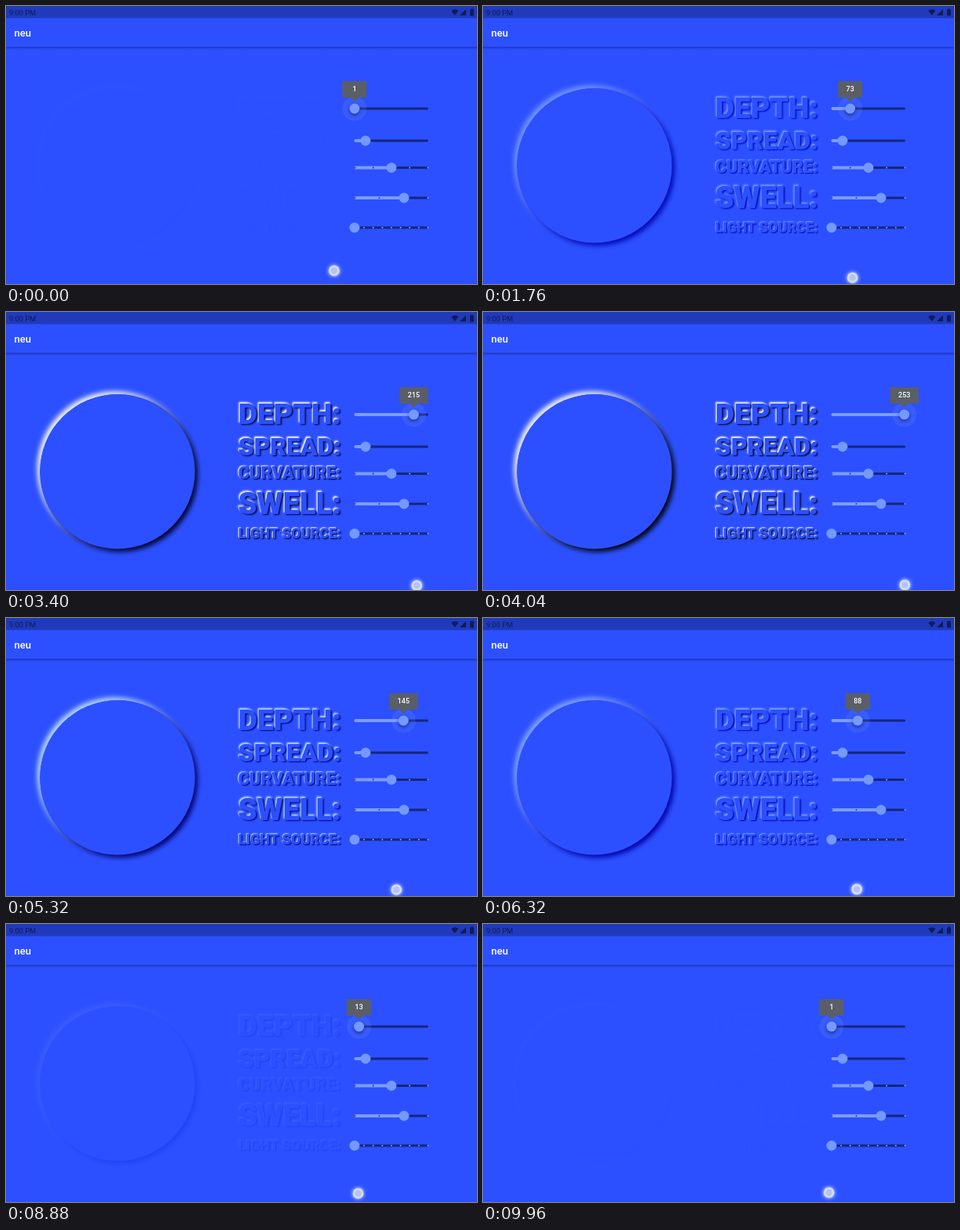
An HTML page with a canvas for the animation above (10 s loop, 600 by 355 pixels).

```html
<!DOCTYPE html>
<html lang="en">
<head>
<meta charset="utf-8">
<title>neu</title>
<style>
html, body { margin: 0; width: 600px; height: 355px; overflow: hidden; background: #2c50ff; }
canvas { display: block; }
</style>
</head>
<body>
<canvas id="stage" width="600" height="355"></canvas>
<script>
const c = document.getElementById('stage').getContext('2d');
const LOOP = 10000, STEP = 40;
const BASE = [44, 80, 255], BG = `rgb(${BASE})`;
const ACTIVE = '#7c9dff', THUMB = '#7499ff', TRACK = '#14277c', INK = '#101c58';
const LEFT = 444, RIGHT = 538;
const FONT = 'Roboto, sans-serif';

// time, x, y of the dragging finger
const drag = [
  [0, 418, 338], [1760, 470.7, 347], [2680, 494.5, 349.8], [2800, 500, 350],
  [3700, 535, 349], [4040, 537.4, 348.5], [4250, 538.5, 348.4], [4900, 535, 347.5],
  [5320, 497.4, 347], [5500, 485, 346.8], [7840, 460, 345.5], [9300, 444, 343.4],
  [9700, 440.7, 343], [10000, 440.7, 343]
];
const rows = [
  { label: 'DEPTH:', y: 131, mid: 129.5 },
  { label: 'SPREAD:', y: 172, mid: 171.5, at: 458 },
  { label: 'CURVATURE:', y: 206.5, mid: 205.5, at: 491, parts: 4 },
  { label: 'SWELL:', y: 245, mid: 244, at: 507, parts: 3 },
  { label: 'LIGHT SOURCE:', y: 283, mid: 282.5, at: 444, parts: 8 }
];

const clamp = (v, lo, hi) => Math.min(hi, Math.max(lo, v));

function finger(t) {
  t = clamp(t, 0, LOOP - 1);
  const i = drag.findIndex(k => k[0] > t);
  const [a, b] = [drag[i - 1], drag[i]];
  const p = (t - a[0]) / (b[0] - a[0]);
  return { x: a[1] + (b[1] - a[1]) * p, y: a[2] + (b[2] - a[2]) * p };
}

const onTrack = x => clamp(x, LEFT, RIGHT);
const shade = d => `rgb(${BASE.map(v => clamp(v + d, 0, 255))})`;

function rect(x, y, w, h, color, r = 0) {
  c.fillStyle = color;
  c.beginPath();
  c.roundRect(x, y, w, h, r);
  c.fill();
}

function disc(x, y, r, color) {
  c.fillStyle = color;
  c.beginPath();
  c.arc(x, y, r, 0, 7);
  c.fill();
}

function poly(color, ...points) {
  c.fillStyle = color;
  c.beginPath();
  points.forEach(p => c.lineTo(...p));
  c.fill();
}

function text(s, x, y, size, weight, color) {
  c.font = `${weight} ${size}px ${FONT}`;
  c.fillStyle = color;
  c.fillText(s, x, y);
}

function withShadow(color, dx, dy, blur, draw) {
  c.save();
  c.shadowColor = color;
  c.shadowOffsetX = dx;
  c.shadowOffsetY = dy;
  c.shadowBlur = blur;
  draw();
  c.restore();
}

// light from the top left, shade to the bottom right
function emboss(depth, offset, blur, draw) {
  withShadow(shade(depth), -offset, -offset, blur, draw);
  withShadow(shade(-depth), offset, offset, blur, draw);
}

function label({ label, mid }, depth) {
  c.font = `900 100px ${FONT}`;
  const size = 13100 / c.measureText(label).width;
  const offset = 0.7 + size * 0.02;
  emboss(depth, offset, offset * 1.5,
    () => text(label, 296, mid + size * 0.3555, size, 900, BG));
}

function slider({ y, at, parts }, x = at) {
  rect(LEFT, y - 1.5, RIGHT - LEFT, 3, TRACK, 1.5);
  rect(LEFT - 0.5, y - 2, x - LEFT + 0.5, 4, ACTIVE, 2);
  for (let i = 0; i <= parts; i++) {
    const tick = LEFT + 0.5 + (RIGHT - LEFT - 1) * i / parts;
    rect(tick - 0.8, y - 0.8, 1.6, 1.6, tick < x ? TRACK : '#9db5ff');
  }
  if (at === undefined) {
    disc(x, y, 15.5, 'rgba(122,155,255,.16)');
    withShadow('rgba(0,0,40,.5)', 0, 2, 5, () => disc(x, y, 6.5, THUMB));
  } else disc(x, y, 6.5, THUMB);
}

function tooltip(x, value) {
  c.font = `500 9px ${FONT}`;
  const w = Math.max(31, c.measureText(value).width + 21);
  const color = '#5a5e66';
  rect(x - w / 2, 96, w, 21, color, 1.5);
  poly(color, [x - 5.5, 116.5], [x + 5.5, 116.5], [x, 122]);
  c.textAlign = 'center';
  text(value, x, 109.3, 9, 500, '#fff');
  c.textAlign = 'left';
}

function bars() {
  const fade = c.createLinearGradient(0, 52, 0, 56);
  fade.addColorStop(0, 'rgba(0,0,60,.32)');
  fade.addColorStop(1, 'rgba(0,0,60,0)');
  rect(0, 52, 600, 4, fade);
  rect(0, 0, 600, 15.5, '#203abb');
  text('9:00 PM', 4, 11.6, 9.3, 400, INK);
  text('neu', 10.5, 39, 13, 500, '#fff');
  c.fillStyle = INK;
  c.beginPath();
  c.moveTo(571.8, 12);
  c.arc(571.8, 12, 7.5, -Math.PI * 0.71, -Math.PI * 0.29);
  c.fill();
  poly(INK, [578, 12], [586, 4], [586, 12]);
  rect(591, 4.2, 5, 8.3, INK, 0.6);
  rect(592.4, 3.3, 2.2, 1, INK);
}

function pointer({ x, y }) {
  withShadow('#fff', 0, 0, 5, () => disc(x, y, 6.8, '#d3ddff'));
  disc(x, y, 4.2, '#b4c2f6');
}

function frame(now) {
  const t = Math.floor(now % LOOP / STEP) * STEP;
  const touch = finger(t);
  const thumb = onTrack(finger(t - 100).x);
  const depth = Math.round(1 + 254 * (onTrack(touch.x) - LEFT) / (RIGHT - LEFT));

  rect(0, 0, 600, 355, BG);
  bars();
  emboss(depth, 3.5, 6.5, () => disc(142, 203.7, 98.7, BG));
  rows.forEach((row, i) => {
    label(row, depth);
    slider(row, i ? row.at : thumb);
  });
  tooltip(thumb, String(depth));
  pointer(touch);
  requestAnimationFrame(() => frame(performance.now()));
}
frame(0);
</script>
</body>
</html>
```
